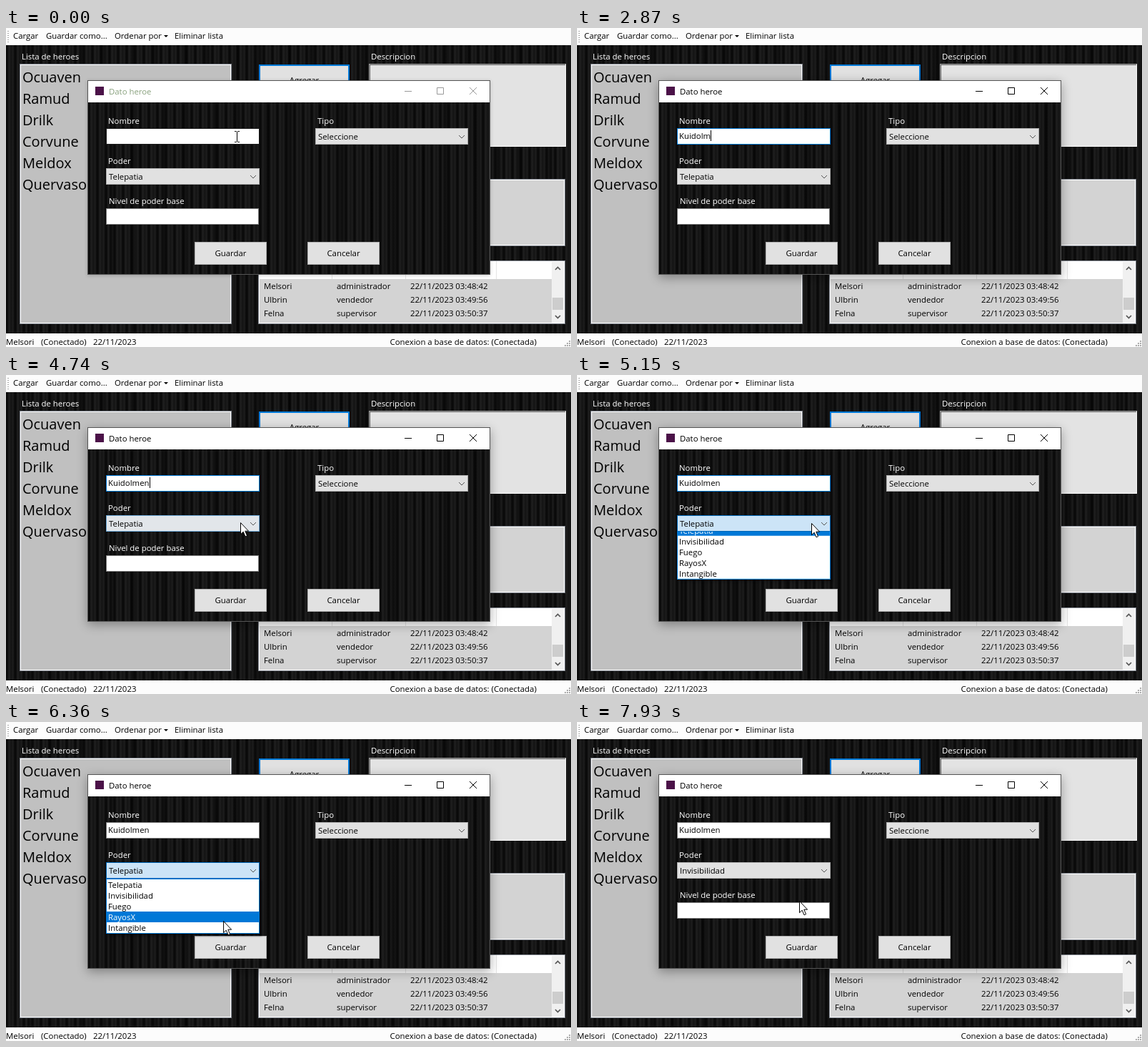
Write an HTML page that moves like this. It is 791 by 446 pixels and loops after 8 s.

```html
<!DOCTYPE html>
<html lang="es">
<head>
<meta charset="utf-8">
<title>Dato heroe</title>
<style>
html, body { margin: 0; width: 100%; height: 100%; overflow: hidden; background: #0a0a0a; }
#stage, #stage * { box-sizing: border-box; }
#stage {
  position: relative; width: 791px; height: 446px; overflow: hidden;
  font: 11.38px/16px "Open Sans", "Noto Sans", sans-serif; color: #000;
  --loop: 8s linear infinite;
}
#stage div, #stage svg { position: absolute; }
.t { white-space: pre; height: 16px; }
.w { color: #fff; }
.stripes {
  background:
    repeating-linear-gradient(90deg, #0000 0 29px, #0007 31px 33px, #0000 35px 58px, #0005 60px 65px, #0000 67px 73px),
    repeating-linear-gradient(90deg, #0a0a0a 0 2px, #1e1e1e 4px 5px, #141414 7px 8px, #1c1c1c 9px 10px, #0a0a0a 12px);
}
.bar { left: 0; width: 791px; background: #fcfcfc; }
.box { border: 1px solid #828790; box-shadow: inset 0 0 0 1px #fff; }
.sunk {
  border: 1px solid; border-color: #a0a0a0 #fff #fff #a0a0a0;
  box-shadow: inset 1px 1px #696969, inset -1px -1px #e3e3e3;
}
.heroes { font-size: 20px; line-height: 30px; white-space: pre; }
.btn { background: #e1e1e1; border: 1px solid #adadad; text-align: center; line-height: 30px; }
.field { border: 1px solid #7a7a7a; background: #fff; height: 23px; }
.combo { border: 1px solid #adadad; background: #e1e1e1; height: 23px; }
.line { fill: none; stroke: #555; }

#dialog { left: 114px; top: 73px; width: 564px; height: 272px; border: 1px solid #555; animation: shade var(--loop); }
@keyframes shade {
  0%, 1.625% { box-shadow: 0 1px 5px #0003; }
  3.625%, 100% { box-shadow: 0 4px 14px #0005; }
}
#title { animation: wake var(--loop); }
@keyframes wake { 0%, 1.625% { color: #8aa27f; } 3.625%, 100% { color: #000; } }
#ctl { animation: ctl var(--loop); }
@keyframes ctl { 0%, 1.625% { stroke: #999; } 3.625%, 100% { stroke: #000; } }

#name { animation: focus var(--loop); }
@keyframes focus {
  0%, 1.625% { border-color: #1a1a1a; }
  3.625%, 65.62% { border-color: #0078d7; }
  65.625%, 100% { border-color: #7a7a7a; }
}
#caret { display: inline-block; width: 1px; height: 15px; background: #000; vertical-align: top; animation: blink 8s step-end infinite; }
@keyframes blink {
  0% { opacity: 0; } 3.625% { opacity: 1; }
  10.375% { opacity: 0; } 16.75% { opacity: 1; }
  46.125% { opacity: 0; } 52.5% { opacity: 1; }
  59.75%, 100% { opacity: 0; }
}

#power { animation: power var(--loop); }
@keyframes power {
  0%, 58% { background: #e1e1e1; border-color: #adadad; }
  59.25% { background: #e2e6ea; border-color: #6aa5d4; }
  61% { background: #e5f1fb; border-color: #0078d7; }
  63%, 90% { background: #cce4f7; border-color: #0067b8; }
  94.25%, 100% { background: #e1e1e1; border-color: #adadad; }
}

#drop { left: 140px; top: 219px; width: 220px; height: 83px; overflow: hidden; animation: open 8s step-end infinite; }
@keyframes open { 0% { visibility: hidden; } 62% { visibility: visible; } 90%, 100% { visibility: hidden; } }
#list { width: 215px; height: 77px; background: #fff; border: 1px solid #0078d7; box-shadow: 3px 3px 3px #0006; animation: slide var(--loop); }
@keyframes slide { 0%, 62% { transform: translateY(-77px); } 64.75%, 100% { transform: none; } }
.rows { left: 0; top: 0; width: 213px; height: 75px; padding-left: 2px; line-height: 15px; white-space: pre; }
.cells { line-height: 19px; white-space: pre; }
#hot { background: #0078d7; color: #fff; animation: hot 8s step-end infinite; }
@keyframes hot {
  0% { clip-path: inset(0 0 60px); }
  70.9% { clip-path: inset(15px 0 45px); }
  72.85% { clip-path: inset(30px 0 30px); }
  75.25% { clip-path: inset(45px 0 15px); }
  77.6% { clip-path: inset(60px 0 0); }
  79.35% { clip-path: inset(45px 0 15px); }
  82.4% { clip-path: inset(30px 0 30px); }
  85.8%, 100% { clip-path: inset(15px 0 45px); }
}

#mouse { left: 0; top: 0; animation: move var(--loop); }
@keyframes move {
  0%, 16.75% { transform: translate(323px, 152px); }
  16.76%, 55% { transform: translate(325px, 150px); animation-timing-function: ease-in-out; }
  59.25% { transform: translate(328px, 206px); }
  60%, 68.875% { transform: translate(328px, 207px); }
  71.25% { transform: translate(315px, 240px); }
  78.75%, 79.125% { transform: translate(303px, 287px); }
  79.5% { transform: translate(304px, 278px); }
  86% { transform: translate(307px, 249px); }
  86.875%, 90% { transform: translate(308px, 244px); }
  91%, 98.7% { transform: translate(309px, 243px); }
  99.125%, 100% { transform: translate(311px, 250px); }
}
#beam { left: -4px; top: -8px; animation: beam 8s step-end infinite; }
@keyframes beam { 0% { opacity: 1; } 16.75% { opacity: 0; } 52.5% { opacity: 1; } 56.2%, 100% { opacity: 0; } }
#arrow { left: -1px; top: -1px; animation: arrow 8s step-end infinite; }
@keyframes arrow { 0% { opacity: 0; } 56.2%, 100% { opacity: 1; } }
</style>
</head>
<body>
<div id="stage" class="stripes">
  <div class="bar" style="top:0;height:24px"></div>
  <div style="left:2px;top:4px;width:2px;height:16px;background:repeating-linear-gradient(#aaa 0 1px,#fcfcfc 1px 3px)"></div>
  <div class="t" style="left:10px;top:3px">Cargar</div>
  <div class="t" style="left:56px;top:3px">Guardar como...</div>
  <div class="t" style="left:152px;top:3px">Ordenar por</div>
  <svg style="left:221px;top:10px" width="7" height="4"><path d="M0 0H6L3 3z"/></svg>
  <div class="t" style="left:236px;top:3px">Eliminar lista</div>

  <div class="t w" style="left:22px;top:32px">Lista de heroes</div>
  <div class="box" style="left:19px;top:50px;width:297px;height:364px;background:#c0c0c0"></div>
  <div class="heroes" style="left:23px;top:54px">Ocuaven
Ramud
Drilk
Corvune
Meldox
Quervaso</div>

  <div class="btn" style="left:354px;top:51px;width:127px;height:42px;line-height:39px;border:2px solid #0078d7">Agregar</div>
  <div class="t w" style="left:511px;top:32px">Descripcion</div>
  <div class="sunk" style="left:508px;top:50px;width:276px;height:116px;background:#e3e3e3"></div>
  <div class="box" style="left:508px;top:211px;width:275px;height:94px;background:#d3d3d3"></div>

  <div class="box" style="left:353px;top:325px;width:430px;height:89px;background:#d3d3d3"></div>
  <div style="left:354px;top:326px;width:410px;height:25px;background:#fff"></div>
  <div style="left:456px;top:326px;width:1px;height:25px;background:#e5e5e5"></div>
  <div style="left:559px;top:326px;width:1px;height:25px;background:#e5e5e5"></div>
  <div style="left:686px;top:326px;width:1px;height:25px;background:#e5e5e5"></div>
  <div class="cells" style="left:361px;top:351px">Melsori
Ulbrin
Felna</div>
  <div class="cells" style="left:463px;top:351px">administrador
vendedor
supervisor</div>
  <div class="cells" style="left:566px;top:351px">22/11/2023 03:48:42
22/11/2023 03:49:56
22/11/2023 03:50:37</div>
  <div style="left:764px;top:327px;width:17px;height:85px;background:#f0f0f0"></div>
  <div style="left:765px;top:377px;width:15px;height:17px;background:#cdcdcd"></div>
  <svg class="line" style="left:768px;top:332px;stroke-width:1.7" width="9" height="76"><path d="M1 6L4.5 2.5 8 6M1 70L4.5 73.5 8 70"/></svg>

  <div class="bar" style="top:427px;height:19px"></div>
  <div class="t" style="left:0;top:431px">Melsori</div>
  <div class="t" style="left:49px;top:431px">(Conectado)</div>
  <div class="t" style="left:122px;top:431px">22/11/2023</div>
  <div class="t" style="left:537.5px;top:431px">Conexion a base de datos: (Conectada)</div>
  <svg style="left:781px;top:436px" width="10" height="10" fill="#aaa"><path d="M7 1h2v2H7zM4 4h2v2H4zM7 4h2v2H7zM1 7h2v2H1zM4 7h2v2H4zM7 7h2v2H7z"/></svg>

  <div id="dialog" class="stripes"></div>
  <div style="left:115px;top:74px;width:562px;height:30px;background:#fff"></div>
  <div style="left:125px;top:82px;width:12px;height:12px;background:#4b1248"></div>
  <div id="title" class="t" style="left:144px;top:81px">Dato heroe</div>
  <svg id="ctl" style="left:558px;top:82px" width="104" height="13" fill="none"><path d="M0 6.5H10M45.5 1.5h9v9h-9zM91 1l10 10M101 1L91 11"/></svg>

  <div class="t w" style="left:143px;top:122px">Nombre</div>
  <div id="name" class="field" style="left:140px;top:140px;width:215px"></div>
  <div class="t" style="left:143px;top:143px;line-height:15px"><span id="typed"></span><span id="caret"></span></div>

  <div class="t w" style="left:436px;top:122px">Tipo</div>
  <div class="combo" style="left:433px;top:140px;width:214px"></div>
  <div class="t" style="left:437px;top:144px">Seleccione</div>
  <svg class="line" style="left:633px;top:149px" width="10" height="7"><path d="M1 1l4 4 4-4"/></svg>

  <div class="t w" style="left:143px;top:178px">Poder</div>
  <div id="power" class="combo" style="left:140px;top:196px;width:215px"></div>
  <div id="chosen" class="t" style="left:144px;top:200px">Telepatia</div>
  <svg class="line" style="left:341px;top:205px" width="10" height="7"><path d="M1 1l4 4 4-4"/></svg>

  <div class="t w" style="left:144px;top:234px">Nivel de poder base</div>
  <div class="field" style="left:140px;top:252px;width:214px"></div>
  <div class="btn" style="left:264px;top:299px;width:101px;height:32px">Guardar</div>
  <div class="btn" style="left:422px;top:299px;width:101px;height:32px">Cancelar</div>

  <div id="drop"><div id="list">
    <div class="rows">Telepatia
Invisibilidad
Fuego
RayosX
Intangible</div>
    <div id="hot" class="rows">Telepatia
Invisibilidad
Fuego
RayosX
Intangible</div>
  </div></div>

  <div id="mouse">
    <svg id="beam" width="9" height="17" fill="none" stroke="#000"><path d="M1 .5H3.5L4.5 1.5 5.5 .5H8M4.5 1V15M1 15.5H3.5L4.5 14.5 5.5 15.5H8"/></svg>
    <svg id="arrow" width="15" height="23" fill="#fff" stroke="#000"><path d="M1.5 1.5V17.7L5.2 14.2 8 20.8 10.6 19.7 7.8 13.2H12.6z"/></svg>
  </div>
</div>
<script>
const LOOP = 8000, NAME = "Kuidolmen", PICK = 7200;
const KEYS = [1370, 1830, 2080, 2310, 2570, 2700, 2870, 3050, 3180];
const typed = document.getElementById("typed");
const chosen = document.getElementById("chosen");
let start;

function setText(el, text) {
  if (el.textContent !== text) el.textContent = text;
}

function draw(now) {
  start ??= now;
  const t = (now - start) % LOOP;
  setText(typed, NAME.slice(0, KEYS.filter(k => k <= t).length));
  setText(chosen, t < PICK ? "Telepatia" : "Invisibilidad");
  requestAnimationFrame(draw);
}
requestAnimationFrame(draw);
</script>
</body>
</html>
```
